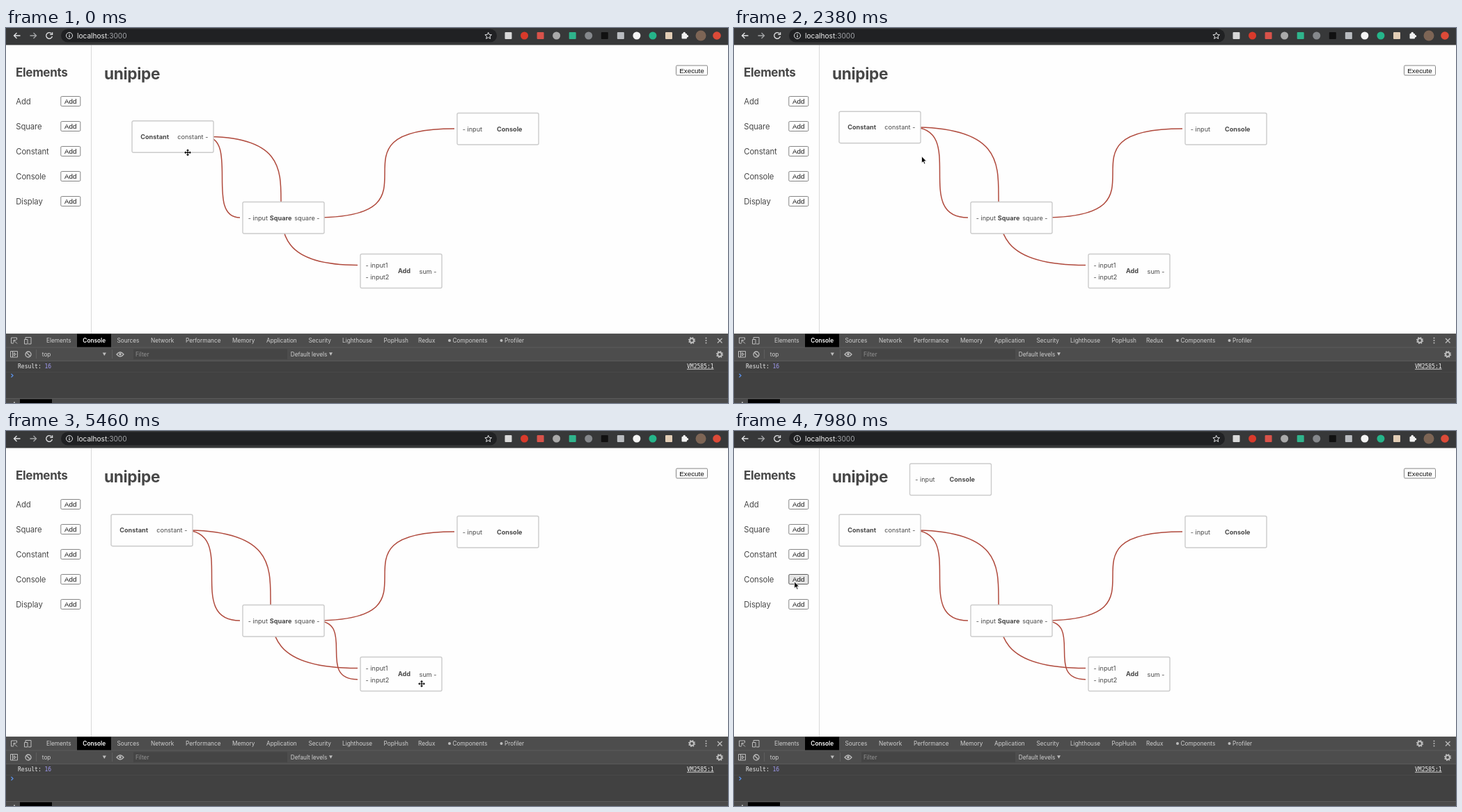
These frames come from a looping animation (1037x540 px, 8000 ms). An HTML page:

```html
<!DOCTYPE html>
<html lang="en">
<head>
<meta charset="utf-8">
<title>Node editor</title>
<style>
  html, body { margin: 0; width: 100%; height: 100%; overflow: hidden; background: #fefefe; }
  svg { display: block; width: 100%; height: 100%; font-family: Inter, "Noto Sans", sans-serif; }
  text { white-space: pre; }
  .b { font-weight: 700; }
  .mid { text-anchor: middle; }
  .head { fill: #474747; letter-spacing: -.3px; }
  .item { font-size: 11.3px; letter-spacing: -.1px; fill: #484848; }
  .btn rect { fill: #fefefe; stroke: #858585; }
  .btn.hot rect { fill: #e6e6e6; stroke: #5c5c5c; }
  .btn text { font: 9.8px "Liberation Sans", Arial, sans-serif; fill: #111; }
  .node { font-size: 9.1px; fill: #484848; }
  .node .box { fill: #fefefe; stroke: #cbcbcb; stroke-width: 1.4; }
  .port rect { fill: none; }
  .port.hot rect { fill: #f09789; }
  .port.hot text { fill: #fbdcd6; }
  .link { fill: none; stroke: #b04a3d; stroke-width: 1.5; }
  .dev { font-size: 8.25px; fill: #d0d0d0; }
  .mono { font: 8px "DejaVu Sans Mono", "Liberation Mono", monospace; fill: #ececec; }
  .line { fill: none; stroke-width: 1.3; }
</style>
</head>
<body>
<svg id="stage" viewBox="0 0 1037 540"></svg>
<script>
const LOOP = 8000, STEP = 70;
const stage = document.getElementById('stage');

const rect = (x, y, w, h, fill, rx = 0) =>
  `<rect x="${x}" y="${y}" width="${w}" height="${h}" rx="${rx}" ${fill ? `fill="${fill}"` : ''}/>`;
const text = (x, y, s, cls = '', attrs = '') => `<text x="${x}" y="${y}" class="${cls}" ${attrs}>${s}</text>`;
const dot = (x, y, r, fill) => `<circle cx="${x}" cy="${y}" r="${r}" fill="${fill}"/>`;
const line = (d, color, attrs = '') => `<path class="line" d="${d}" stroke="${color}" ${attrs}/>`;

// Node contents use offsets from the node's corner; a port is [label, dx, dy, width].
const nodes = {
  constant: { x: 181, y: 133.8, h: 45.5, title: ['Constant', 12.3], ports: [['constant -', 65.3, 23, 44]] },
  square: { x: 340, y: 250.5, h: 45.5, title: ['Square', 38.8], ports: [['- input', 7.7, 23, 28], ['square -', 74.3, 23, 36]] },
  add: { x: 509, y: 325.5, h: 49, title: ['Add', 54], ports: [['- input1', 7.6, 16.5, 33], ['- input2', 7.6, 33, 34], ['sum -', 84.6, 25, 25]] },
  console: { x: 648, y: 122.5, h: 45.5, title: ['Console', 57], ports: [['- input', 7.8, 23, 28]] },
  extra: { x: 252.5, y: 47, h: 45.5, title: ['Console', 57], ports: [['- input', 7.8, 23, 28]] }
};
const NODE_W = 117;

const nodeMarkup = ([id, n]) => `<g id="${id}" class="node">
  <rect class="box" width="${NODE_W}" height="${n.h}" rx="2"/>
  ${text(n.title[1], n.h / 2 + 3.4, n.title[0], 'b')}
  ${n.ports.map(([s, x, y, w]) =>
    `<g class="port">${rect(x - 3, y - 8.3, w + 6, 17, '', 2)}${text(x, y + 3.2, s)}</g>`).join('')}
</g>`;

// Links: from node, to node, height of the input port.
const links = [
  ['constant', 'square', 22.5],
  ['constant', 'add', 16],
  ['square', 'console', 22.5],
  ['square', 'add', 32.3]
];

function linkPath([from, to, dy]) {
  const a = nodes[from], b = nodes[to];
  const x1 = a.x + NODE_W - 13, y1 = a.y + 22.5, x2 = b.x - 4, y2 = b.y + dy;
  return `M${x1} ${y1}C${x2} ${y1} ${x1} ${y2} ${x2} ${y2}`;
}

const button = (x, y, w, label, id) =>
  `<g class="btn" id="${id}">${rect(x, y, w, 14, '', 1.5)}${text(x + w / 2, y + 10.6, label, 'mid')}</g>`;

function gear(x, y) {
  return `<g fill="none" stroke="#bdbdbd"><circle cx="${x}" cy="${y}" r="2.9" stroke-width="2"/>
    <circle cx="${x}" cy="${y}" r="4.3" stroke-width="1.6" stroke-dasharray="1.7 1.68"/></g>`;
}

function browserBar() {
  const c = '#e4e5e7';
  // Toolbar badges: colour and shape.
  const badges = [['#d9d9d9', 1], ['#d93a2b', 0], ['#d8524a', 1], ['#aaaaaa', 0], ['#2fb48c', 1],
    ['#85888c', 0], ['#111111', 1], ['#b9bcc0', 1], ['#f4f4f4', 0], ['#25b58a', 0], ['#e2cdb5', 1]];
  return rect(0, 0, 1037, 24.5, '#373839') + rect(79, 1.5, 626, 19, '#202123', 9.5) +
    line('M20.5 11H11.5M15.5 7L11.5 11L15.5 15', c) +
    line('M34.5 11H43.5M39.5 7L43.5 11L39.5 15', '#a5a6a8') +
    line('M65.4 8A4.4 4.4 0 1 0 66.4 12M66.6 6.2V9.4H63.2', c) +
    `<circle class="line" cx="91" cy="11" r="4.5" stroke="${c}" style="stroke-width:1"/>` +
    line('M91 10.4V13.4M91 8.4V9.5', c) +
    text(102, 14.6, 'localhost<tspan fill="#a2a4a8">:3000</tspan>', '', 'fill="#f1f1f1" font-size="10.15"') +
    line('M692.7 6.3L694.1 9.5L697.5 9.8L694.9 12L695.7 15.4L692.7 13.6L689.7 15.4L690.5 12L687.9 9.8L691.3 9.5Z', c, 'style="stroke-width:1"') +
    badges.map(([fill, square], i) => {
      const x = 721.5 + i * 23.05;
      return square ? rect(x - 5, 6, 10, 10, fill, 1) : dot(x, 11, 5.5, fill);
    }).join('') +
    rect(970.5, 8, 7.5, 7.5, '#f1f1f1', 1) + dot(974.2, 7.6, 1.8, '#f1f1f1') + dot(978.4, 11.7, 1.8, '#f1f1f1') +
    dot(998, 11, 7.5, '#7d6555') + dot(1021, 11, 5.8, '#dc4a38');
}

function page() {
  const items = ['Add', 'Square', 'Constant', 'Console', 'Display'];
  return rect(122, 24.5, 1, 416, '#d9d9d9') +
    text(14, 70, 'Elements', 'b head', 'font-size="17"') +
    text(141, 74, 'unipipe', 'b head', 'font-size="22.6"') +
    items.map((s, i) => text(14.3, 110 + i * 36, s, 'item') +
      button(78.8, 98.5 + i * 36, 28, 'Add', 'btn' + s)).join('') +
    button(962.5, 54, 45, 'Execute', 'run');
}

function devtools() {
  const tabs = [['Elements', 58], ['Sources', 159.5], ['Network', 208], ['Performance', 258], ['Memory', 325],
    ['Application', 374], ['Security', 434.5], ['Lighthouse', 483], ['PopHush', 542.5], ['Redux', 592],
    ['Components', 641.5], ['Profiler', 716]];
  const c = '#bdbdbd';
  return `<g class="dev">` +
    rect(0, 440, 1037, 20, '#4d4d4d') + rect(0, 460, 1037, 19.5, '#4d4d4d') +
    rect(0, 459.5, 1037, 1, '#5d5d5d') + rect(0, 440, 1037, 1, '#5a5a5a') +
    rect(0, 479.5, 1037, 54, '#414141') + rect(0, 479, 1037, 1, '#5a5a5a') +
    rect(102, 440.5, 49, 19, '#000') + text(110.3, 453, 'Console', '', 'font-weight="600" fill="#fff"') +
    tabs.map(([s, x]) => text(x, 453, s)).join('') + dot(637, 450, 2, c) + dot(711.5, 450, 2, c) +
    line('M11 454H7.5V446H15.5V449M11 449.5L16 454.5M11 453V449.5H14.5', c, 'style="stroke-width:1"') +
    line('M28 448V445.5H36V455H32M26.5 448.5H31V455H26.5Z', c, 'style="stroke-width:1"') +
    gear(985, 450) + [446.5, 450, 453.5].map(y => dot(1005.5, y, 1, c)).join('') +
    line('M1022 447L1028.5 453.5M1028.5 447L1022 453.5', c) +
    line('M6.5 465.5H16.5V474H6.5ZM9.5 465.5V474M11.5 467.5L14.5 469.8L11.5 472Z', c, 'style="stroke-width:1"') +
    line('M28 470A4 4 0 1 0 36 470A4 4 0 1 0 28 470M29.2 467.2L34.8 472.8', c) +
    rect(43, 463, 1, 13, '#5e5e5e') + rect(152, 463, 1, 13, '#5e5e5e') +
    text(51.8, 472.5, 'top') + `<path d="M138.7 467.5h5.2l-2.6 4.4z" fill="${c}"/>` +
    line('M159 470Q164 463.5 169 470Q164 476 159 470Z', c) + dot(164, 469.7, 1.8, c) +
    rect(183, 462.5, 221, 14.5, '#454545') + text(186, 472.7, 'Filter', '', 'fill="#929292"') +
    text(408.7, 472.5, 'Default levels') + `<path d="M464 467.3h5l-2.5 4.4z" fill="${c}"/>` + gear(1025, 470) +
    rect(0, 495, 1037, 1, '#484848') +
    text(17, 489.8, 'Result: <tspan fill="#a09bf2">16</tspan>', 'mono') +
    text(978, 489.8, 'VM2585:1', 'mono', 'text-decoration="underline"') +
    line('M7.5 498L10 500.5L7.5 503', '#5c92e8') +
    rect(0, 533, 1037, 7, '#4a4a4a') + rect(0, 533, 1037, 1, '#5a5a5a') +
    rect(20, 534.5, 46, 5.5, '#000') + dot(12, 539.3, 1, c) + `</g>`;
}

const arm = 'M0 -4.9L2.1 -2.7H.6V0H-.6V-2.7H-2.1Z';
const pointer = `<g id="pointer">
  <circle id="ring" cx="-.8" cy="-.8" r="13.3" fill="#fff" fill-opacity=".6" stroke="#111" stroke-width="1.5"/>
  <g id="move" fill="#000">
    ${['stroke="#fff" stroke-width="1.2"', ''].map(outline => `<g ${outline}>` +
      [0, 90, 180, 270].map(a => `<path d="${arm}" transform="rotate(${a})"/>`).join('') + '</g>').join('')}</g>
  <path id="arrow" d="M0 0V9.6L2.2 7.6L3.8 11.2L5.4 10.5L3.8 7H6.9Z" fill="#000" stroke="#fff" stroke-width=".8"/>
</g>`;

stage.innerHTML = rect(0, 0, 1037, 540, '#fefefe') + page() +
  links.map((_, i) => `<path class="link" id="link${i}"/>`).join('') +
  Object.entries(nodes).map(nodeMarkup).join('') + browserBar() + devtools() + pointer;

const $ = id => document.getElementById(id);
const show = (id, on) => $(id).setAttribute('visibility', on ? 'visible' : 'hidden');
const place = (id, x, y) => $(id).setAttribute('transform', `translate(${x} ${y})`);

// Tracks: time, x, y.
const pointerTrack = [[0, 261, 179.3], [350, 233, 160.5], [770, 209, 159], [1540, 203.5, 149], [2030, 203.5, 149],
  [3010, 430, 272], [3570, 430, 272], [4480, 536, 358], [4830, 536, 358], [5460, 597, 364], [5740, 597, 364],
  [6790, 78, 195], [7350, 86.7, 217]];
const dragTrack = [[350, 181, 133.8], [770, 157, 132.3], [1540, 151, 120.2]];
const presses = [[350, 1750], [3500, 4830], [7420, 7560]];
const LINK_AT = 4830, SPAWN_AT = 7560;

function along(track, t) {
  const i = track.findIndex(k => k[0] > t);
  if (i === 0) return track[0].slice(1);
  if (i < 0) return track[track.length - 1].slice(1);
  const [t0, x0, y0] = track[i - 1], [t1, x1, y1] = track[i];
  const u = (t - t0) / (t1 - t0), e = u * u * (3 - 2 * u);
  return [x0 + (x1 - x0) * e, y0 + (y1 - y0) * e];
}

const inside = (px, py, x, y, w, h) => px >= x && px <= x + w && py >= y && py <= y + h;

function draw(t) {
  const [px, py] = along(pointerTrack, t);
  [nodes.constant.x, nodes.constant.y] = along(dragTrack, t);

  let overNode = false;
  for (const [id, n] of Object.entries(nodes)) {
    place(id, n.x, n.y);
    const live = id !== 'extra' || t >= SPAWN_AT;
    show(id, live);
    overNode = overNode || live && inside(px, py, n.x, n.y, NODE_W, n.h);
    $(id).querySelectorAll('.port').forEach((el, i) => {
      const [, dx, dy, w] = n.ports[i];
      el.classList.toggle('hot', live && inside(px, py, n.x + dx - 3, n.y + dy - 8, w + 6, 16));
    });
  }
  links.forEach((l, i) => $('link' + i).setAttribute('d', linkPath(l)));
  show('link3', t >= LINK_AT);

  document.querySelectorAll('.btn').forEach(el => {
    const b = el.firstChild, v = name => +b.getAttribute(name);
    el.classList.toggle('hot', inside(px, py, v('x'), v('y'), v('width'), v('height')));
  });

  place('pointer', px, py);
  show('ring', presses.some(([a, b]) => t >= a && t < b));
  show('move', overNode);
  show('arrow', !overNode);
}

const start = performance.now();
function tick() {
  const t = (performance.now() - start) % LOOP;
  draw(Math.floor(t / STEP) * STEP);
  requestAnimationFrame(tick);
}
tick();
</script>
</body>
</html>
```
